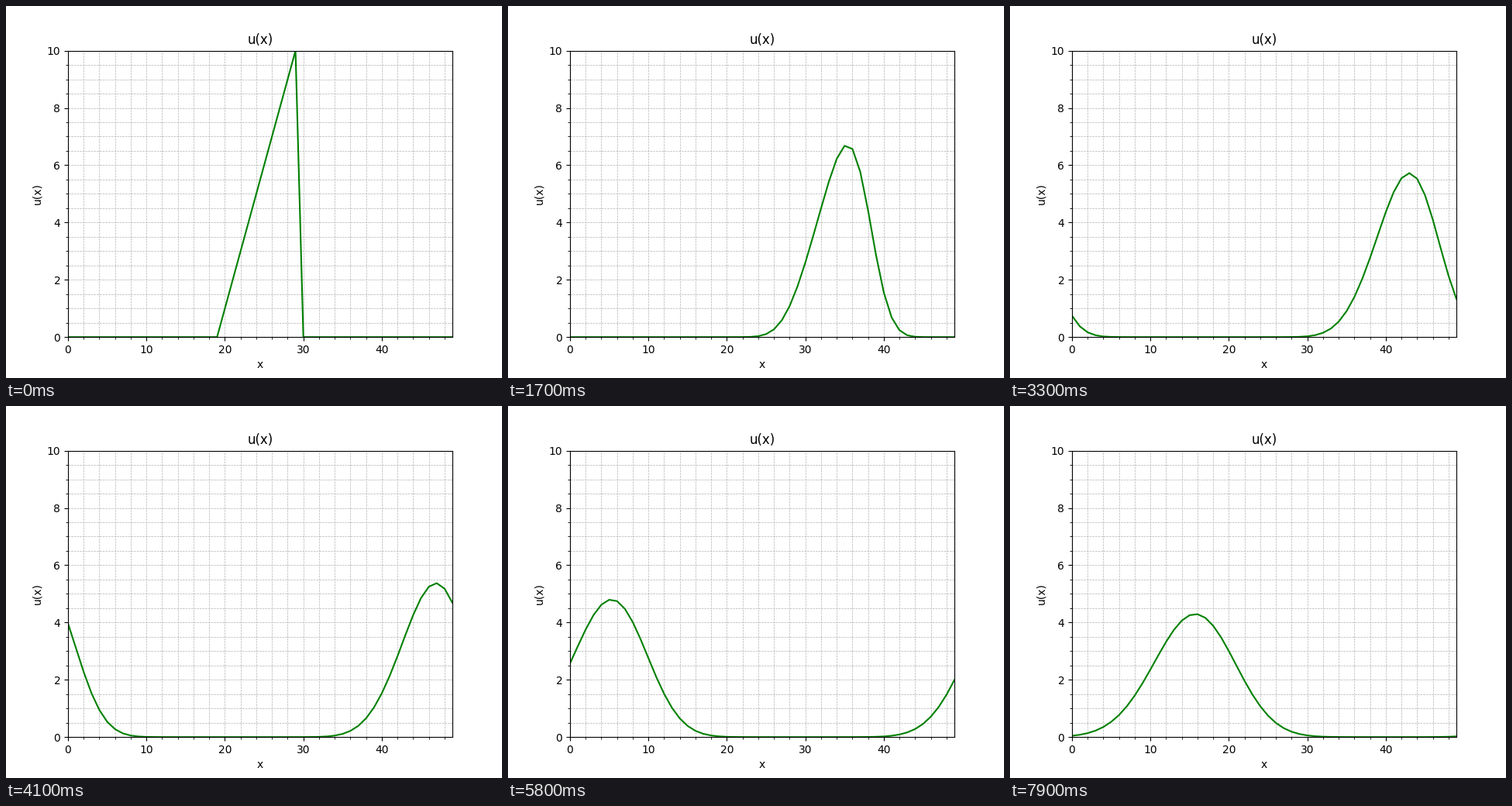
Recreate the animation shown at these times as a matplotlib script. Size 640 px wide and 480 px high, loop 8 s.

```python
import numpy as np
import matplotlib.pyplot as plt
from matplotlib.animation import FuncAnimation

N = 50          # periodic cells
FRAMES = 80
COURANT = 0.5   # upwind advection, cells per step


def solve():
    """Return the wave at every step of the upwind scheme."""
    x = np.arange(N)
    u = np.where((x >= 19) & (x < 30), x - 19.0, 0.0)
    history = [u]
    for _ in range(FRAMES - 1):
        u = u - COURANT * (u - np.roll(u, 1))
        history.append(u)
    return x, history


x, history = solve()

fig, ax = plt.subplots(figsize=(6.4, 4.8), dpi=100)
ax.set(xlim=(0, N - 1), ylim=(0, 10), title="u(x)", xlabel="x", ylabel="u(x)")
ax.minorticks_on()
ax.grid(True, which="both", linestyle="--", linewidth=0.5)
line, = ax.plot(x, history[0], color="green")


def update(i):
    line.set_ydata(history[i])
    return line,


anim = FuncAnimation(fig, update, frames=FRAMES, interval=100, repeat=True,
                     repeat_delay=0)
plt.show()
```
